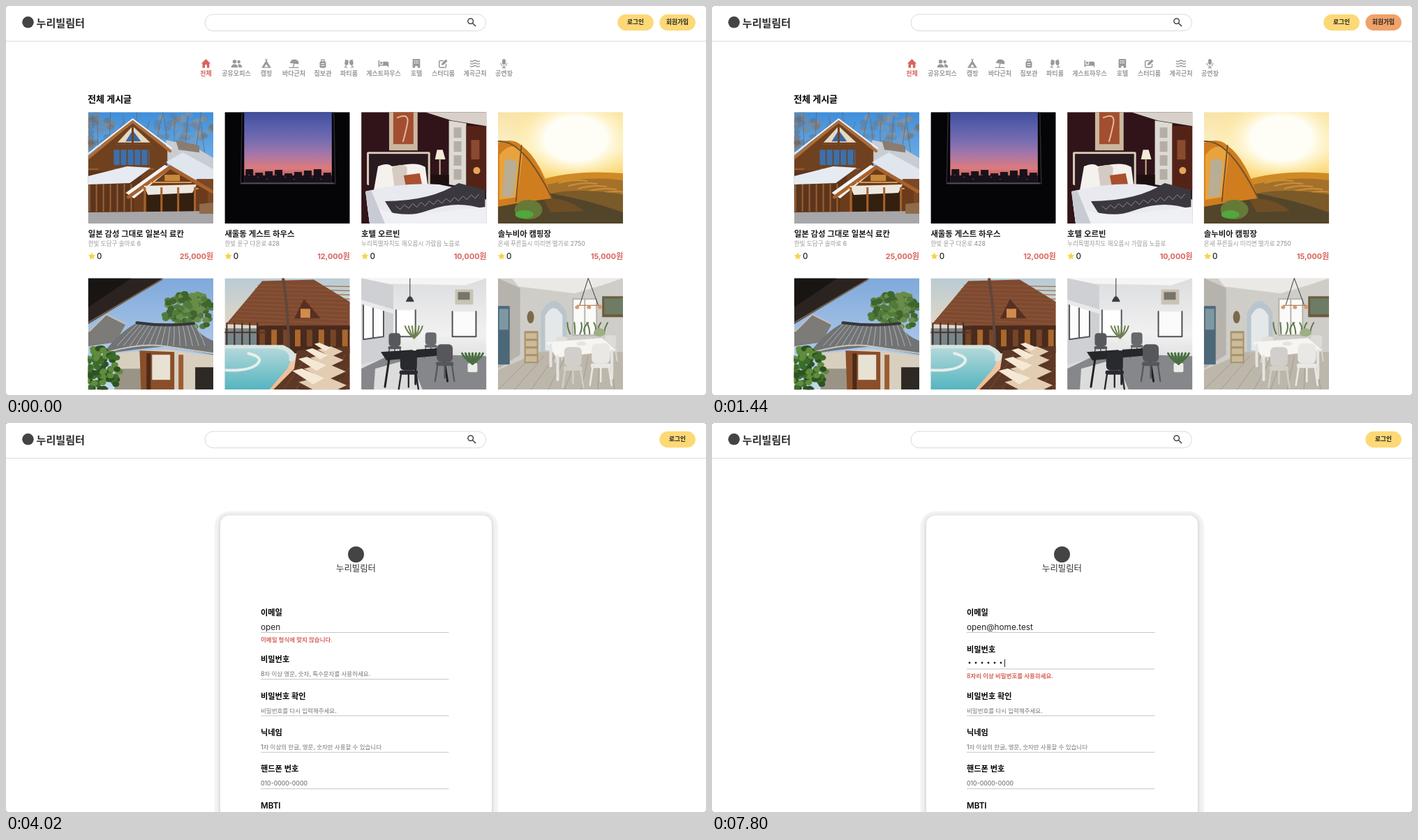
An HTML page that plays this animation: 1003x558 px, repeating every 8 s.

```html
<!DOCTYPE html>
<html lang="ko">
<head>
<meta charset="utf-8">
<style>
  html, body { margin: 0; width: 100%; height: 100%; overflow: hidden; background: #fff; }
  svg { display: block; }
  text { font-family: Inter, "Noto Sans CJK KR", "Noto Sans CJK", sans-serif; font-weight: 600; white-space: pre; }
  .medium { font-weight: 500; }
  .thin { font-weight: 400; }
  .bold { font-weight: 700; }
  #panel { filter: drop-shadow(0 1px 3px rgba(0, 0, 0, .2)); }
</style>
</head>
<body>
<svg id="stage" width="1003" height="558" viewBox="0 0 1003 558" xmlns="http://www.w3.org/2000/svg"></svg>
<script>
const LOOP = 8000, SIGNUP = 1500;
const RED = '#d8645c', GRAY = '#999', YELLOW = [253, 216, 118], ORANGE = [240, 162, 106];
const BRAND = '누리빌림터';
const rgb = c => `rgb(${c.map(Math.round)})`;

// Drawing helpers
const rect = (fill, x, y, w, h, r = 0, more = '') =>
  `<rect x="${x}" y="${y}" width="${w}" height="${h}" rx="${r}" fill="${fill}" ${more}/>`;
const poly = (fill, pts) => `<polygon fill="${fill}" points="${pts}"/>`;
const oval = (fill, x, y, rx, ry = rx) => `<ellipse fill="${fill}" cx="${x}" cy="${y}" rx="${rx}" ry="${ry}"/>`;
const path = (fill, d) => `<path fill="${fill}" d="${d}"/>`;
const line = (color, w, d) =>
  `<path fill="none" stroke="${color}" stroke-width="${w}" stroke-linecap="round" stroke-linejoin="round" d="${d}"/>`;
const text = (x, y, size, str, fill = '#1c1c1c', more = '') =>
  `<text x="${x}" y="${y}" font-size="${size}" fill="${fill}" ${more}>${str}</text>`;
const middle = 'text-anchor="middle"';
const times = (n, fn) => Array.from({ length: n }, (_, i) => fn(i)).join('');

let seed = 7;
const rnd = () => (seed = seed * 16807 % 2147483647) / 2147483647;

// Round cloud of small blobs
const cloud = (n, x, y, rx, ry, size, colors) => times(n, i => {
  const a = rnd() * 6.283, d = Math.sqrt(rnd());
  return oval(colors[i % colors.length], (x + rx * d * Math.cos(a)).toFixed(1), (y + ry * d * Math.sin(a)).toFixed(1), size, size * .8);
});

const fades = {
  noon: ['#3f8fdb', '#a9d2f2'],
  dusk: ['#414f9a', '#5a5fac', '#766cb0', '#a577a9', '#dd7a7c', '#a84a4c'],
  dawn: ['#f8e3a8', '#fdf1c8', '#f8c64a', '#c9801f'],
  clear: ['#7fa9db', '#c4d9ee'],
  peach: ['#b9cbd3', '#e9d9c4', '#f0b98c'],
  room: ['#dcdddf', '#f1f1f1', '#c9cacc'],
  water: ['#b6d9db', '#54b5c0'],
};
const defs = Object.entries(fades).map(([id, cs]) =>
  `<linearGradient id="${id}" x2="0" y2="1">${cs.map((c, i) =>
    `<stop offset="${i / (cs.length - 1)}" stop-color="${c}"/>`).join('')}</linearGradient>`).join('') +
  '<radialGradient id="sun"><stop offset=".45" stop-color="#fffef6"/><stop offset="1" stop-color="#ffe27a" stop-opacity="0"/></radialGradient>';

// Pictures, each on a 180 x 160 board
const ryokan = () =>
  rect('url(#noon)', 0, 0, 180, 160) +
  cloud(40, 14, 30, 26, 30, 5, ['#8d7f7866', '#6f625a66']) + cloud(50, 134, 22, 46, 20, 5, ['#a3938755', '#7d6d6255']) +
  times(14, i => line('#75655a', .8, `M${i * 14} 62q${i % 3 * 4 - 4}-30 ${i % 4 * 5 - 6}-${48 + i % 3 * 9}`)) +
  poly('#c9cdd2', '112,40 150,48 180,66 180,90 112,74') + poly('#8a7c70', '126,40 160,48 160,58 130,54') +
  poly('#70411f', '8,58 64,16 114,54 114,112 0,130 0,64') +
  times(6, i => line('#a56733', 1.5, `M${-2 + i * 20} ${82 + i % 2 * 3}h16`)) +
  poly('#e4d9c4', '40,46 64,20 92,46') + poly('#3b66a0', '54,42 64,26 76,42') +
  line('#70411f', 3, 'M64 18v30M40 45h52') +
  line('#b06a32', 4, 'M0 66 64 13 118 56') + line('#f2f2f2', 2, 'M0 60 64 10 120 52') +
  rect('#3f6fa8', 36, 54, 52, 22) + times(6, i => line('#6e3f1e', 1.5, `M${36 + i * 10} 53v24`)) +
  rect('#5c351c', 0, 84, 76, 60) + times(8, i => line('#9b6233', 2, `M${2 + i * 10} 104v38`)) +
  poly('#e6ebf2', '0,92 56,78 90,80 60,102 0,104') +
  poly('#dfe6ee', '112,72 136,58 180,82 180,102 150,96') + rect('#7b4826', 156, 96, 24, 42) +
  poly('#6b3c1c', '66,116 120,78 172,110 172,146 66,150') +
  poly('#f3f5f8', '54,116 110,76 120,80 66,124') +
  line('#a9622c', 5, 'M58 122 118 79 178 114') + line('#d69a58', 2, 'M78 110h80M90 101h58') +
  rect('#33200f', 84, 112, 70, 34) + poly('#ece8e0', '80,106 156,104 150,116 86,119') +
  rect('#c78a3a', 110, 90, 22, 9) + times(4, i => rect('#a8632c', 80 + i * 24, 108, 3, 40)) +
  poly('#a7a6a8', '0,144 180,142 180,160 0,160') + poly('#8f6b4b', '160,132 180,130 180,146 160,146');

const night = () =>
  rect('#050406', 0, 0, 180, 160) + rect('url(#dusk)', 28, 0, 126, 101) +
  rect('#17111b', 28, 91, 126, 10) +
  times(9, i => rect('#17111b', 30 + i * 14, 82 + i * 5 % 7, 11, 16)) +
  times(9, i => rect('#b0603c', 34 + i * 13, 90 + i % 3 * 3, 1.5, 1)) +
  line('#2c2a35', 1.5, 'M25 0 23 103H159L157 0') + line('#777785', 1, 'M24 102h133');

const hotel = () =>
  rect('#301419', 0, 0, 180, 160) + poly('#d8d1ca', '92,0 180,0 180,20 130,12') +
  rect('#cbb79f', 40, 0, 41, 55) + rect('#a34e31', 46, 0, 29, 46) +
  line('#e3b897', 2, 'M52 8q18-8 14 10t-6 24') +
  poly('#ddd9d3', '126,12 151,16 151,108 126,104') + times(4, i => rect('#b5aea7', 133, 22 + i * 20, 11, 15)) +
  rect('#542318', 151, 20, 29, 92) + rect('#8a4a30', 158, 40, 12, 28) + oval('#e7a45a', 166, 84, 5) +
  rect('#d9cbb9', 8, 57, 91, 48, 2) + rect('#291a1f', 11, 60, 85, 48) +
  path('#f3ead8', 'M106 68l3-14h8l4 14z') + line('#c7b592', 2, 'M113 68v22') + rect('#1c0f10', 100, 90, 26, 24) +
  path('#f5f1ed', 'M18 112 24 78q14-6 20 0l22-3q16-2 26 4l4 30z') + path('#d5cbc2', 'M44 80q16-8 22 0l-2 30H48z') +
  poly('#a9502f', '61,91 84,88 88,107 65,111') +
  path('#e8eaf0', 'M6 114Q60 100 112 104L152 112 180 126V160H12z') +
  path('#3a383e', 'M34 128Q100 128 140 102L178 112V140Q140 126 100 140T44 144z') +
  times(10, i => line('#a5a3a8', .8, `M${50 + i * 12} ${135 - i * 1.8}l6 5 5-6`)) +
  path('#eff0f4', 'M8 130Q34 150 84 146T180 136V160H12z') + poly('#c9cbd4', '6,114 14,112 34,160 12,160');

const camp = () =>
  rect('url(#dawn)', 0, 0, 180, 160) + oval('url(#sun)', 112, 38, 98, 70) +
  path('#cf8a25', 'M60 98Q110 82 180 88V160H60z') + path('#a5702a', 'M56 108Q120 90 180 98V160H56z') +
  times(6, i => line('#c98f3c', 2, `M${88 + i * 14} ${102 + i * 4}q20-6 40-3`)) +
  path('#7a5a29', 'M60 122Q100 106 180 118V160H40z') +
  path('#52452a', 'M0 116H72Q130 126 180 144V160H0z') +
  path('#cf7d1f', 'M0 44Q22 36 34 48Q60 66 78 124L34 130 0 136z') +
  path('#e9a33c', 'M2 62Q18 40 36 56L28 122 2 126z') + path('#b9ad94', 'M10 70Q20 62 28 74L22 122H6z') +
  line('#74512a', 2, 'M0 42Q36 38 78 124M34 48 26 128') +
  oval('#667a38', 44, 140, 20, 14) + oval('#50a83e', 38, 147, 13, 6) + path('#6f4d25', 'M66 126q30-6 58 16l-48 2z');

const hanok = () =>
  rect('url(#clear)', 0, 0, 180, 160) +
  cloud(110, 144, 48, 38, 27, 5, ['#527a39', '#3f652e', '#6a8c49']) +
  poly('#2a2320', '0,0 108,0 70,24 0,66') + poly('#191512', '0,0 62,0 0,42') + line('#75614c', 2, 'M0 64 106 2') +
  poly('#7c7b78', '0,78 26,52 54,66 40,92 0,98') + line('#c4c0b8', 2, 'M2 76 26 52l28 14') +
  path('#727375', 'M28 100Q52 72 72 64L150 66Q162 84 180 90V110L110 98Q70 102 28 108z') +
  times(15, i => line('#b3b3b3', 1, `M${70 + i * 6} 67q${i * 2 - 18} 18 ${i * 3 - 28} 30`)) +
  line('#35373a', 4, 'M70 64Q110 70 152 65') + line('#c9c5bc', 2, 'M28 106Q80 92 112 98L180 108') +
  poly('#d9cfbf', '38,108 112,102 180,112 180,160 38,160') + poly('#9a9486', '38,130 80,130 80,160 38,160') +
  poly('#8a4e2a', '74,104 124,106 124,160 76,160') + poly('#e8e2d5', '92,110 118,110 118,146 92,146') +
  rect('#4b2a18', 84, 108, 6, 52) + rect('#9c5c32', 130, 110, 7, 50) + rect('#2f2925', 154, 128, 26, 32) +
  cloud(110, 16, 134, 32, 34, 5, ['#3c6c2c', '#618c3b', '#2d5222']);

const lounger = (x, y, s) => `<g transform="translate(${x} ${y}) scale(${s})">` +
  poly('#573526', '-24,12 8,26 36,14 34,20 8,32 -24,17') + poly('#e2cdb2', '-24,8 8,0 36,12 8,25') +
  poly('#f5e8d5', '-32,-6 -20,-9 8,3 -6,11') + '</g>';
const pool = () =>
  rect('url(#peach)', 0, 0, 180, 160) + rect('#77868c', 0, 72, 60, 24) +
  poly('#7e4a30', '54,4 128,2 180,34 180,74 2,66') +
  times(11, i => line('#8f593c', 1, `M${48 - i * 4} ${10 + i * 5.4}L180 ${12 + i * 6}`)) +
  poly('#573022', '100,58 114,30 138,58') + rect('#d08c4b', 109, 44, 14, 13) +
  rect('#4a2a1c', 46, 68, 134, 40) + times(8, i => rect(i % 2 ? '#a9682f' : '#754528', 50 + i * 17, 74, 8, 24)) +
  line('#62463a', 4, 'M84 0Q92 50 92 106') + times(5, i => rect('#3f2a21', 2 + i * 11, 64, 2, 34)) +
  line('#513629', 2, 'M0 78h60') +
  path('url(#water)', 'M0 98H76Q104 104 90 130L64 160H0z') + path('#d6e5e2', 'M0 96H84Q110 108 98 120L92 118Q96 104 74 101H0z') +
  line('#e7eeea', 4, 'M34 108Q58 114 46 124t-46 8') +
  poly('#5d3826', '104,104 180,98 180,160 70,160 100,130') + times(6, i => line('#7a4d37', 1, `M${84 + i * 18} 160l36-50`)) +
  lounger(148, 98, .6) + lounger(142, 108, .8) + lounger(138, 122, 1) + lounger(134, 140, 1.15);

const chair = (x, y, s, c) => `<g transform="translate(${x} ${y}) scale(${s})">` +
  rect(c, -10, -20, 20, 22, 5) + rect(c, -11, 2, 22, 5, 2) + line(c, 2, 'M-9 6l-3 20M9 6l3 20M0 6v16') + '</g>';

const office = () =>
  rect('url(#room)', 0, 0, 180, 160) + poly('#f5f5f6', '0,0 180,0 150,10 40,8') + poly('#cfd0d3', '0,0 46,10 46,112 0,124') +
  poly('#85878b', '0,130 46,108 180,112 180,160 0,160') + poly('#dddcdc', '20,130 70,116 88,160 18,160') +
  poly('#fdfdfd', '3,36 32,46 32,84 3,88') + line('#55575c', 2, 'M3 36v52L32 84V46M17 41v45') + line('#e9e9eb', 6, 'M0 34l46 14h134') +
  rect('#fff', 50, 46, 26, 38) + line('#595b60', 2, 'M50 46v38h28V46') +
  rect('#fbfbfb', 132, 48, 32, 36) + line('#4e5055', 2, 'M131 48v36h34V48') +
  rect('#c9c3b5', 135, 16, 26, 22, 1) + rect('#77746c', 139, 20, 17, 11) +
  line('#333', 1, 'M70 0v26') + path('#3d3d40', 'M64 34q6-16 12 0z') +
  chair(48, 96, .85, '#56585c') + chair(100, 94, .8, '#68696d') +
  poly('#26272a', '28,106 118,100 126,110 36,118') + line('#222326', 3, 'M40 116l-6 40M118 110l6 38M78 112v40') +
  path('#e9eae8', 'M74 104l-2-18h9l-2 18z') + times(6, i => line('#6d7f4c', 2, `M76 86q${i * 4 - 10}-8 ${i * 5 - 13}-17`)) +
  chair(120, 118, 1.15, '#55575b') + chair(68, 130, 1.2, '#292a2d') +
  rect('#ececea', 153, 122, 14, 13, 2) + times(7, i => line('#4a7041', 3, `M160 123q${i * 4 - 12}-8 ${i * 5 - 15}-15`));

const dining = () =>
  rect('#cfcdc8', 0, 0, 180, 160) + poly('#ebe9e5', '20,0 180,0 150,10 110,22 30,12') +
  poly('#b6b2ac', '0,0 32,14 32,110 0,130') + poly('#bdb6ab', '0,132 60,106 180,106 180,160 0,160') +
  times(8, i => line('#a49b90', 1, `M${i * 24} 160l${50 - i * 8}-48`)) +
  rect('#4c6878', 0, 40, 17, 84) + rect('#7e98a3', 2, 44, 13, 30) +
  path('#b9c5cd', 'M62 106V50q18-34 37 0v56z') + path('#e5e8e8', 'M68 104V54q12-22 25 0v50z') +
  rect('#fafaf8', 108, 30, 34, 52) + line('#b7b3ad', 2, 'M108 30h34v52h-34zM125 30v52') +
  rect('#6c5a40', 150, 26, 30, 30) + rect('#6f7c65', 153, 29, 27, 23) +
  rect('#a8916c', 38, 76, 20, 46) + times(4, i => rect('#cbbb98', 40, 79 + i * 11, 16, 8)) +
  oval('#7b6a4a', 47, 56, 5, 9) + times(8, i => line('#5d7a4b', 2, `M${104 + i * 7} 80q${i % 3 * 4 - 4}-8 ${i % 4 * 3 - 4}-16`)) +
  line('#3c3a38', 1, 'M130 0l-12 38M130 0l14 38') + line('#a86b45', 1, 'M114 39h34') +
  [114, 131, 147].map(x => oval('#d99b6b', x, 42, 3, 2.5)).join('') +
  chair(92, 100, .8, '#e0dfdb') + chair(162, 98, .8, '#dddcd8') +
  poly('#f6f5f2', '70,92 150,86 170,104 84,114') + line('#e6e4e0', 4, 'M86 112v34M164 104v40M76 96v30') +
  oval('#9eaf83', 146, 78, 8, 6) + oval('#e5e5e0', 120, 94, 7, 3) +
  chair(108, 124, 1.25, '#d2cfca') + chair(148, 120, 1.3, '#e9e8e4');

const rooms = [
  ['일본 감성 그대로 일본식 료칸', '한빛 도담구 솔마로 6', '25,000', ryokan],
  ['새울동 게스트 하우스', '한빛 윤구 다온로 428', '12,000', night],
  ['호텔 오르빈', '누리특별자치도 해오름시 가람읍 노을로', '10,000', hotel],
  ['솔누비아 캠핑장', '온새 푸른들시 미리면 별가로 2750', '15,000', camp],
  [, , , hanok], [, , , pool], [, , , office], [, , , dining],
];
const star = 'M0-5.2 1.6-1.8 5.2-1.4 2.5 1.1 3.2 4.8 0 3-3.2 4.8-2.5 1.1-5.2-1.4-1.6-1.8z';

function room([title, place, price, scene], i) {
  const x = 117.7 + i % 4 * 195.7, y = i < 4 ? 152.2 : 390.4;
  const photo = `<svg x="${x}" y="${y}" width="179.3" height="159.8" viewBox="0 0 180 160" preserveAspectRatio="none">${scene()}</svg>`;
  if (!title) return photo;
  return photo + text(x, 331, 11.4, title) + text(x, 344.2, 8.6, place, GRAY, 'class="medium"') +
    `<g transform="translate(${x + 5.2} 358.8)">${path('#f8d347', star)}</g>` + text(x + 12.3, 363, 11.5, '0', '#222', 'class="medium"') +
    text(x + 179.3, 362.6, 10.8, price + '원', RED, 'text-anchor="end" class="bold"');
}

// Category icons on a 16 x 16 board
const kinds = [
  [286.5, '전체', c => path(c, 'M8 0 0 8h2v7.5h4.3V10h3.4v5.5H14V8h2z')],
  [330, '공유오피스', c => oval(c, 5, 4.5, 3.4) + oval(c, 12.5, 5, 2.8) + path(c, 'M-1 15a6 6 0 0 1 12 0zM11 9.6a5 5 0 0 1 7 5.4h-5.5z')],
  [373, '캠핑', c => path(c, 'M8 2 16.5 15.5h-17z') + line(c, 1.6, 'M6.6 .6 8 3 9.4 .6') + path('#fff', 'M8 9l3.6 5h-7.2z')],
  [412.5, '바다근처', c => path(c, 'M1 7Q4-1 11 1t5 8z') + line(c, 1.6, 'M9 6 7 14M0 15h16')],
  [454, '짐보관', c => rect(c, 2.5, 4, 11, 11.5, 2.5) + line(c, 1.6, 'M5.5 4V1h5v3') + line('#fff', 1.2, 'M5.5 8h5M5.5 11.5h5')],
  [491.5, '파티룸', c => path(c, 'M1.5 1 7 2.5 7 8a3 3 0 0 1-6.5-1zM14.5 1 9 2.5 9 8a3 3 0 0 0 6.5-1z') + line(c, 1.4, 'M3.5 9 2 14M0 14l4.5 1M12.5 9 14 14M16 14l-4.5 1')],
  [541, '게스트하우스', c => path(c, 'M-1 2h2v8h6V4.5h7a3 3 0 0 1 3 3V14h-2v-2H1v2h-2z') + oval(c, 4, 6.7, 2)],
  [588, '호텔', c => rect(c, 1.5, 0, 13, 15.5, 1) + times(6, i => rect('#fff', 4 + i % 3 * 3, 2.5 + (i > 2) * 3.5, 1.8, 1.8)) + path('#fff', 'M5.5 15.5a2.5 3.5 0 0 1 5 0z')],
  [626.5, '스터디룸', c => line(c, 1.8, 'M8 3H3Q1 3 1 5v8q0 2 2 2h8q2 0 2-2V9') + path(c, 'M5 11l.6-3.5L12.5.6l3 3L8.5 10.4z')],
  [672, '계곡근처', c => times(3, i => line(c, 1.7, `M0 ${3.5 + i * 4.5}q2.7 2 5.3 0t5.3 0 5.4 0`))],
  [713.5, '공연장', c => rect(c, 5, 0, 6, 10, 3) + line(c, 1.5, 'M2.8 7.5a5.2 5.2 0 0 0 10.4 0M8 13v2.5M5.5 15.5h5')],
];
const kind = ([x, name, icon], i) => {
  const c = i ? GRAY : RED;
  return `<g transform="translate(${x - 6.6} 76) scale(.82)">${icon(c)}</g>` + text(x, 100, 9, name, c, middle);
};

const button = (x, name, id) =>
  rect(rgb(YELLOW), x, 12, 51.6, 23.2, 11.6, `id="${id}"`) + text(x + 25.8, 26.2, 8.7, name, '#222', middle);

// Sign-up form
const LEFT = 365, PITCH = 52.4, ERROR_GAP = 14.6;
const fields = [
  ['이메일', 'open@home.test', 9.4, '이메일 형식에 맞지 않습니다.'],
  ['비밀번호', '8자 이상 영문, 숫자, 특수문자를 사용하세요.', 8.5, '8자리 이상 비밀번호를 사용하세요.'],
  ['비밀번호 확인', '비밀번호를 다시 입력해주세요.', 8.5],
  ['닉네임', '1자 이상의 한글, 영문, 숫자만 사용할 수 있습니다', 8.5],
  ['핸드폰 번호', '010-0000-0000', 8.6],
];
const field = ([label, hint, size, error], i) => {
  const y = 272 + i * PITCH;
  return `<g id="field${i}">` + text(LEFT, y + 4.2, 11.2, label, '#000') +
    text(LEFT, y + 24.2, size, hint, '#757575', `id="hint${i}" class="medium"`) +
    rect('#c6c6c6', LEFT, y + 28, 269.5, 1) +
    (error ? text(LEFT, y + 41.5, 8.5, error, RED, `id="error${i}"`) : '') + '</g>';
};

const $ = id => document.getElementById(id);
$('stage').innerHTML = `<defs>${defs}</defs>` + rect('#999', 0, 0, 1003, 558) + rect('#fff', 0, 0, 1003, 558, 3) +
  oval('#444', 31.5, 23.3, 8.3) + text(43.5, 29.7, 15.1, BRAND, '#2b2b2b') +
  rect('#fff', 285, 12, 402.5, 23.7, 11.85, 'stroke="#d9d9d9"') +
  line('#444', 1.5, 'M669.5 21.8a3.8 3.8 0 1 1-7.6 0a3.8 3.8 0 1 1 7.6 0M668.6 24.7 672.7 28.6') +
  rect('#dcdcdc', 0, 50, 1003, 1) +
  `<g id="home">${button(876.3, '로그인', 'login')}${button(936.3, '회원가입', 'join')}` +
  kinds.map(kind).join('') + text(117, 137.5, 13, '전체 게시글', '#000') + rooms.map(room).join('') + '</g>' +
  `<g id="form">${button(936.3, '로그인', 'back')}` +
  rect('#f4f4f4', 298.5, 126.5, 406.5, 500, 22) + rect('#fff', 307, 132.5, 389, 500, 13, 'id="panel"') +
  oval('#444', 501.5, 188.5, 11.5) + text(501.5, 213, 12.4, BRAND, '#333', `${middle} class="medium"`) +
  fields.map(field).join('') +
  `<g id="tail">${text(LEFT, 538.5, 11.6, 'MBTI', '#000')}` +
  rect('#fff', 365.5, 546.8, 271, 24, 3, 'stroke="#c8c8c8"') + text(372, 561, 9.5, 'mbti', '#666', 'class="medium"') +
  line('#888', 1, 'M621 557l4 4 4-4') + '</g>' +
  text(LEFT, 296.6, 11.8, '', '#222', 'id="mail" class="thin"') +
  `<g id="dots">${times(6, i => oval('#222', 369 + i * 9, 344, 1.4))}</g>` +
  rect('#222', 0, 0, 1, 11, 0, 'id="caret"') + '</g>';

// Key presses: "|" focuses, "_" blinks the caret off, tab moves on, "*" is a hidden letter
const keys = [
  [2430, '|'], [2850, '_'], [3120, 'o'], [3240, 'p'], [3360, 'e'], [3570, 'n'], [4020, '_'], [4200, '@'],
  [4590, 'h'], [4770, 'o'], [4920, 'm'], [5040, 'e'], [5160, '.'], [5370, 't'], [5550, 'e'], [5655, 's'], [5760, 't'],
  [6060, '\t'], [6510, '_'], [6540, '*'], [6780, '*'], [7050, '*'], [7290, '*'], [7560, '*'], [7800, '*'],
];
const show = (el, on) => el.setAttribute('display', on ? 'inline' : 'none');
const shift = (el, y) => el.setAttribute('transform', `translate(0 ${y})`);

function draw(t) {
  show($('home'), t < SIGNUP);
  show($('form'), t >= SIGNUP);
  const hover = Math.min(1, Math.max(0, (t - 1350) / 90));
  $('join').setAttribute('fill', rgb(YELLOW.map((c, i) => c + (ORANGE[i] - c) * hover)));

  let mail = '', dots = 0, caret = false, row = 0;
  for (const [at, key] of keys) {
    if (at > t) break;
    caret = key !== '_';
    if (key === '\t') row = 1;
    else if (key === '*') dots++;
    else if (!'|_'.includes(key)) mail += key;
  }
  const badMail = mail !== '' && !/.@.+\.\w{3,}$/.test(mail);
  const badPass = dots > 0 && dots < 8;

  $('mail').textContent = mail;
  [...$('dots').children].forEach((dot, i) => show(dot, i < dots));
  show($('hint0'), !mail);
  show($('hint1'), !dots);
  show($('error0'), badMail);
  show($('error1'), badPass);
  fields.forEach((_, i) => shift($('field' + i), (badMail && i > 0 || badPass && i > 1) ? ERROR_GAP : 0));
  shift($('tail'), badMail || badPass ? ERROR_GAP : 0);

  show($('caret'), caret);
  const typed = row ? dots * 9 : mail ? $('mail').getComputedTextLength() : 0;
  $('caret').setAttribute('x', LEFT + Math.round(typed));
  $('caret').setAttribute('y', row ? 339 : 287);
}

const start = performance.now();
function tick() {
  draw((performance.now() - start) % LOOP);
  requestAnimationFrame(tick);
}
tick();
</script>
</body>
</html>
```
